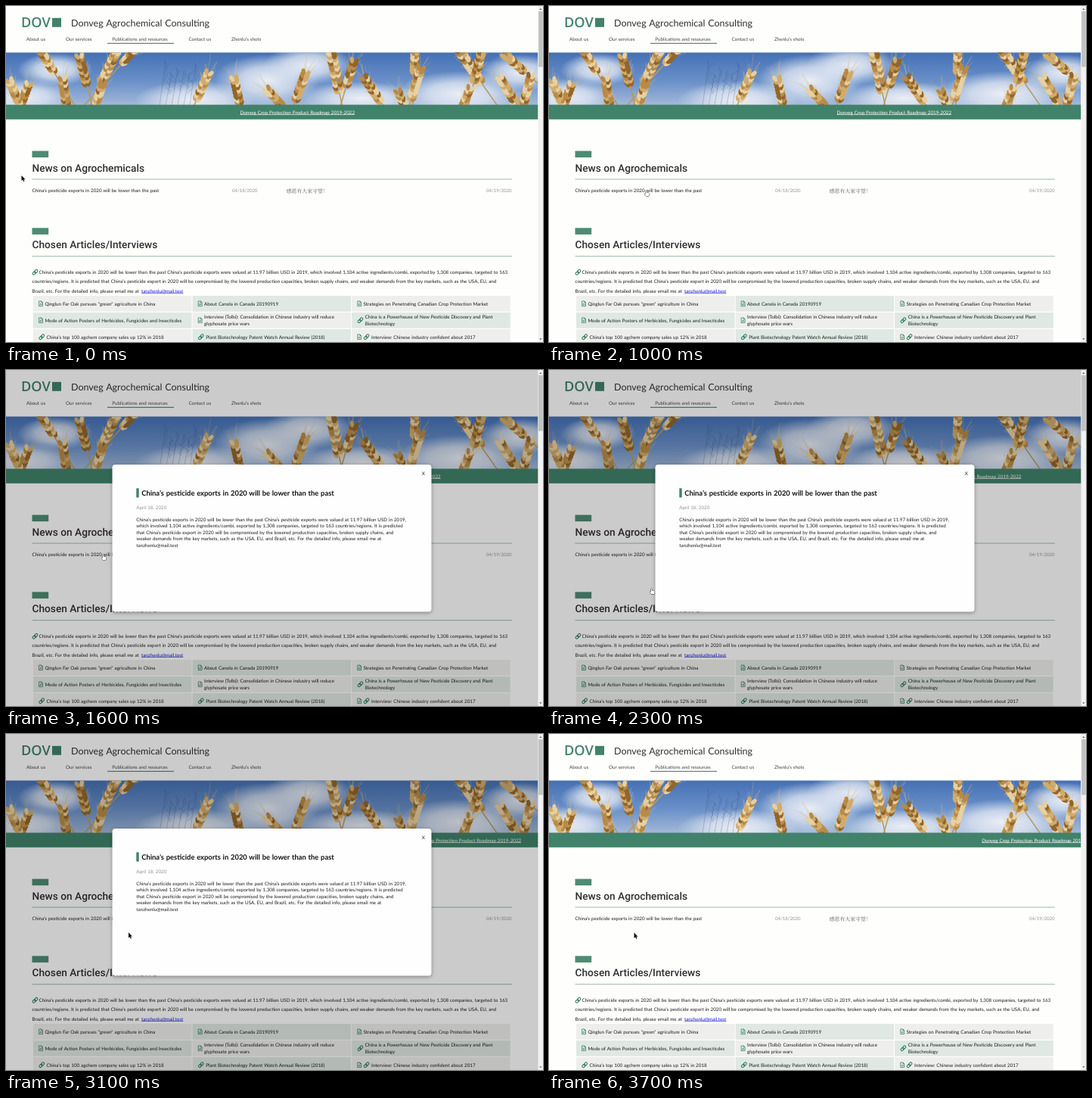
An HTML page with a canvas that plays this animation: 710 px wide and 444 px high, repeating every 3800 ms.

```html
<!DOCTYPE html>
<html lang="en">
<head>
<meta charset="utf-8">
<title>Agrochemical news</title>
<style>
html, body { margin: 0; width: 100%; height: 100%; overflow: hidden; background: #fefefd; }
canvas { display: block; width: 100%; height: 100%; }
</style>
</head>
<body>
<canvas id="stage" width="710" height="444"></canvas>
<script>
const W = 710, H = 444, VIEW = 703.5;
const LOOP = 3800, STEP = 100, OPEN = 1100, CLOSE = 3600;
const BODY = 6.9, INK = '#1c1c1c', GREY = '#929292', GREEN = '#40826a';
const BAND = { y: 130.5, h: 19.3 };
const MODAL = { x: 140.5, y: 125, w: 422, h: 194.5 };
const MAIL = 'tanzhenlu@mail.test';

const stage = document.getElementById('stage').getContext('2d');
const page = document.createElement('canvas');
page.width = W;
page.height = H;
let g = page.getContext('2d');

function rect(x, y, w, h, color) {
  g.fillStyle = color;
  g.fillRect(x, y, w, h);
}

function setFont(font, spacing = 0) {
  g.font = font;
  g.wordSpacing = spacing + 'px';
  g.textRendering = 'geometricPrecision';
}

// Lato set slightly smaller with wider word gaps; returns the advance width.
function text(str, x, y, size = BODY, color = INK, weight = 400) {
  setFont(`${weight} ${size * 0.907}px Lato, sans-serif`, size * 0.047);
  g.fillStyle = color;
  g.fillText(str, x, y);
  return g.measureText(str).width;
}

function linkText(str, x, y, color) {
  const w = text(str, x, y, BODY, color);
  rect(x, y + 0.8, w, 0.6, color);
}

function stroke(points, color, width) {
  g.strokeStyle = color;
  g.lineWidth = width;
  g.beginPath();
  points.forEach(([x, y], i) => i ? g.lineTo(x, y) : g.moveTo(x, y));
  g.stroke();
}

function seeded(seed) {
  return () => (seed = (seed * 16807) % 2147483647) / 2147483647;
}

function cloud(x, y, rx, ry) {
  g.save();
  g.translate(x, y);
  g.scale(rx, ry);
  const fade = g.createRadialGradient(0, 0, 0, 0, 0, 1);
  fade.addColorStop(0, 'rgba(240,242,247,.95)');
  fade.addColorStop(0.5, 'rgba(226,232,243,.75)');
  fade.addColorStop(1, 'rgba(215,226,242,0)');
  g.fillStyle = fade;
  g.fillRect(-1, -1, 2, 2);
  g.restore();
}

// A wheat ear: tip at x, y; the stem leaves it at the given lean.
function ear(x, y, len, lean, rnd) {
  const wide = 4 + len / 16;
  g.save();
  g.translate(x, y);
  g.rotate(lean);
  stroke([[0, len], [1, len + 75]], '#b9975a', 1.5);
  for (let d = 0; d < len; d += 4.2) {
    for (const side of [-1, 1]) {
      stroke([[side, d], [side * (4 + rnd() * 7), d - 12 - rnd() * 12]], 'rgba(214,186,128,.6)', 0.5);
    }
  }
  for (let d = len; d > 0; d -= 4.2) {
    for (const side of [-1, 1]) {
      g.fillStyle = ['#b98a45', '#d2ab68', '#e8d0a0', '#946527'][Math.floor(rnd() * 4)];
      g.beginPath();
      g.ellipse(side * wide * 0.48, d, wide * 0.42, 4.4, side * 0.45, 0, 7);
      g.fill();
    }
  }
  g.restore();
}

const EARS = [
  [44, 56, 36, -0.55], [74, 92, 42, -0.15], [30, 103, 34, 0.35], [97, 66, 38, -0.25],
  [147, 58, 46, 0.45], [172, 56, 26, 0.75], [128, 101, 34, 0.3], [4, 98, 34, -0.4],
  [268, 88, 38, 0.42], [301, 93, 36, -0.22], [343, 108, 32, -0.75], [397, 86, 40, 0.35],
  [429, 57, 56, -0.2], [461, 70, 36, 0.3], [471, 91, 42, -0.6], [541, 55, 32, 0.05],
  [549, 80, 44, 0.3], [518, 112, 30, -0.4], [598, 57, 52, -0.6], [629, 60, 40, 0.25],
  [657, 62, 36, -0.85], [652, 93, 40, -0.55], [694, 92, 38, 0.25], [614, 108, 30, 0.4]
];

function banner() {
  g.save();
  g.beginPath();
  g.rect(0, 61.5, VIEW, 69.5);
  g.clip();
  const sky = g.createLinearGradient(0, 61, 0, 131);
  sky.addColorStop(0, '#4470b4');
  sky.addColorStop(0.55, '#6a90c8');
  sky.addColorStop(1, '#a3b9d8');
  rect(0, 61, VIEW, 70, sky);
  [[65, 84, 50, 22], [20, 120, 70, 24], [250, 124, 80, 25], [345, 98, 70, 34], [400, 78, 60, 26],
   [470, 122, 80, 22], [600, 116, 85, 30], [680, 88, 55, 24]].forEach(c => cloud(...c));

  const rnd = seeded(41);
  for (let i = 0; i < 6; i++) {
    const x = 203 + i * 8, top = 74 + rnd() * 18;
    stroke([[x + 8, top], [x, 131]], 'rgba(62,82,116,.55)', 0.5);
    for (let k = 0; k < 7; k++) {
      const y = top + k * 4, bx = x + 8 - (y - top) * 0.14;
      stroke([[bx, y + 3], [bx + (rnd() - 0.5) * 13, y - 2]], 'rgba(62,82,116,.5)', 0.6);
    }
  }
  EARS.forEach(e => ear(...e, rnd));
  g.restore();
}

function linkIcon(x, y) {
  g.save();
  g.translate(x + 4, y);
  g.rotate(-Math.PI / 4);
  g.strokeStyle = '#2f7a5e';
  g.lineWidth = 1;
  for (const dx of [-4.1, -0.7]) {
    g.beginPath();
    g.roundRect(dx, -1.6, 4.8, 3.2, 1.6);
    g.stroke();
  }
  g.restore();
}

function docIcon(x, y) {
  const c = '#2f7a5e';
  stroke([[x + 3.6, y - 3.3], [x + 0.4, y - 3.3], [x + 0.4, y + 3.3], [x + 5.3, y + 3.3],
          [x + 5.3, y - 1.6], [x + 3.6, y - 3.3], [x + 3.6, y - 1.6], [x + 5.3, y - 1.6]], c, 0.75);
  stroke([[x + 1.6, y + 2], [x + 2.8, y - 0.6], [x + 4.2, y + 1.2], [x + 1.6, y + 1.5]], c, 0.6);
}

function section(title, y) {
  rect(34.5, y, 21.7, 8.6, '#4f8a74');
  setFont('500 13.7px Roboto, sans-serif');
  g.fillStyle = '#303030';
  g.fillText(title, 34.5, y + 27);
  rect(34.5, y + 37, 634.5, 0.9, '#8db4a4');
}

// Cells: icon kinds (d = document, l = link) and one or two lines.
const CELLS = [
  ['d', 'Qinglun Far Oak pursues "green" agriculture in China'],
  ['d', 'About Canola in Canada 20190919'],
  ['d', 'Strategies on Penetrating Canadian Crop Protection Market'],
  ['d', 'Mode of Action Posters of Herbicides, Fungicides and Insecticdes'],
  ['d', 'Interview (Tolbi): Consolidation in Chinese industry will reduce', 'glyphosate price wars'],
  ['l', 'China is a Powerhouse of New Pesticide Discovery and Plant', 'Biotechnology'],
  ['l', 'China’s top 100 agchem company sales up 12% in 2018'],
  ['l', 'Plant Biotechnology Patent Watch Annual Review (2018)'],
  ['dl', 'Interview: Chinese industry confident about 2017']
];

function table() {
  CELLS.forEach(([icons, ...lines], i) => {
    const col = i % 3, row = Math.floor(i / 3);
    const left = 36 + col * 210.6, top = 383 + row * 22, mid = top + 10.5;
    rect(left, top, 209.5, 20.8, i % 2 ? '#dfe8e3' : '#eeefec');
    let x = left + 7.2;
    for (const kind of icons) {
      (kind === 'd' ? docIcon : linkIcon)(x, mid - 0.2);
      x += kind === 'd' ? 8.2 : 10.4;
    }
    lines.forEach((line, n) => text(line, x, mid + 2.1 + (n - (lines.length - 1) / 2) * 8.6));
  });
}

function scrollbar() {
  rect(VIEW, 0, W - VIEW, H, '#f1f1f1');
  rect(VIEW + 0.6, 7, 5.6, 73.5, '#c1c1c1');
  g.fillStyle = '#606060';
  for (const [y, dir] of [[4, -1], [440.3, 1]]) {
    g.beginPath();
    g.moveTo(705.2, y - dir);
    g.lineTo(708.4, y - dir);
    g.lineTo(706.8, y + dir);
    g.fill();
  }
}

function drawPage() {
  rect(0, 0, W, H, '#fefefd');
  setFont('600 18.2px "Open Sans", sans-serif');
  g.fillStyle = GREEN;
  g.fillText('DOV', 20, 27.8);
  rect(61, 15.8, 12, 12, GREEN);
  text('Donveg Agrochemical Consulting', 86, 27, 13.8, '#303030');

  [['About us', 27], ['Our services', 79], ['Publications and resources', 140.3],
   ['Contact us', 241.5], ['Zhenlu’s shots', 298]]
    .forEach(([label, x]) => text(label, x, 46.3, BODY, '#424242'));
  rect(134, 48.8, 88, 1.1, GREEN);

  banner();
  rect(0, BAND.y, VIEW, BAND.h, GREEN);

  section('News on Agrochemicals', 191.5);
  text('China’s pesticide exports in 2020 will be lower than the past', 34.5, 246.3);
  text('04/18/2020', 299, 246.3, 6.7, GREY);
  text('04/19/2020', 635, 246.3, 6.7, GREY);
  setFont('300 6.9px "Noto Serif CJK SC", "Noto Sans CJK SC", "Noto Sans CJK", serif');
  g.fillStyle = '#555';
  g.fillText('感恩有大家守望！', 370.7, 246.7);

  section('Chosen Articles/Interviews', 293.3);
  linkIcon(34.5, 351.8);
  text('China’s pesticide exports in 2020 will be lower than the past China’s pesticide exports were valued at 11.97 billion USD in 2019, which involved 1,104 active ingredients/combi, exported by 1,308 companies, targeted to 163', 43.6, 354.2);
  text('countries/regions. It is predicted that China’s pesticide export in 2020 will be compromised by the lowered production capacities, broken supply chains, and weaker demands from the key markets, such as the USA, EU, and', 34.5, 366.3);
  text('Brazil, etc. For the detailed info, please email me at', 34.5, 378.5);
  linkText(MAIL, 179, 378.5, '#1a1ad6');
  table();
  scrollbar();
}

function marquee(t) {
  g.save();
  g.beginPath();
  g.rect(0, BAND.y, VIEW, BAND.h);
  g.clip();
  linkText('Donveg Crop Protection Product Roadmap 2019-2022', 309.5 + t * 0.071, 142.6, '#fff');
  g.restore();
}

function modal() {
  rect(0, 0, VIEW, H, 'rgba(0,0,0,.2)');
  g.save();
  g.shadowColor = 'rgba(0,0,0,.35)';
  g.shadowBlur = 5;
  g.shadowOffsetY = 1.5;
  g.fillStyle = '#fefefe';
  g.beginPath();
  g.roundRect(MODAL.x, MODAL.y, MODAL.w, MODAL.h, 4);
  g.fill();
  g.restore();

  text('X', 549.7, 138.8);
  rect(172.3, 156.3, 3.4, 12.2, GREEN);
  text('China’s pesticide exports in 2020 will be lower than the past', 179.2, 166, 10.35, '#101010', 700);
  text('April 18, 2020', 172.3, 183.9, BODY, GREY);
  ['China’s pesticide exports in 2020 will be lower than the past China’s pesticide exports were valued at 11.97 billion USD in 2019,',
   'which involved 1,104 active ingredients/combi, exported by 1,308 companies, targeted to 163 countries/regions. It is predicted',
   'that China’s pesticide export in 2020 will be compromised by the lowered production capacities, broken supply chains, and',
   'weaker demands from the key markets, such as the USA, EU, and Brazil, etc. For the detailed info, please email me at',
   MAIL].forEach((line, i) => text(line, 172.3, 199.6 + i * 8.55));
}

// Pointer stops: time, x, y
const PATH = [
  [0, 20.5, 224], [800, 128.5, 243.6], [1700, 128.5, 243.6], [2300, 135.5, 288.5],
  [3100, 162, 262.3], [3400, 112.5, 262.6], [LOOP, 112.5, 262.6]
];

function pointerAt(t) {
  const i = PATH.findIndex(p => p[0] > t);
  const [t0, x0, y0] = PATH[i - 1], [t1, x1, y1] = PATH[i];
  const u = (t - t0) / (t1 - t0), k = u * u * (3 - 2 * u);
  return [x0 + (x1 - x0) * k, y0 + (y1 - y0) * k];
}

const inside = (x, y, b) => x >= b.x && x <= b.x + b.w && y >= b.y && y <= b.y + b.h;
const HEADLINE = { x: 34, y: 240, w: 168, h: 8.5 };
const ARROW = new Path2D('M0 0V7.1L1.6 5.6L2.7 8.1L3.9 7.6L2.8 5.2H5Z');
const HAND = new Path2D('M-.6 .5Q0 -.5 .6 .5V3L3.4 3.6Q4.3 3.9 4.1 5L3.5 7.6H-.4L-2.2 4.8Q-2 3.8 -.6 5Z');

function pointer(t, open) {
  const [x, y] = pointerAt(t);
  const hand = open ? !inside(x, y, MODAL) : inside(x, y, HEADLINE);
  const shape = hand ? HAND : ARROW;
  g.save();
  g.translate(x, y);
  g.lineWidth = 0.9;
  g.lineJoin = 'round';
  g.strokeStyle = hand ? '#222' : '#fff';
  g.fillStyle = hand ? '#fff' : '#0a0a0a';
  g.stroke(shape);
  g.fill(shape);
  g.restore();
}

function render(t) {
  const open = t >= OPEN && t < CLOSE;
  g.drawImage(page, 0, 0);
  marquee(t);
  if (open) modal();
  pointer(t, open);
}

drawPage();
g = stage;
const start = performance.now();

function tick() {
  const t = (performance.now() - start) % LOOP;
  render(Math.floor(t / STEP) * STEP);
  requestAnimationFrame(tick);
}
tick();
</script>
</body>
</html>
```
